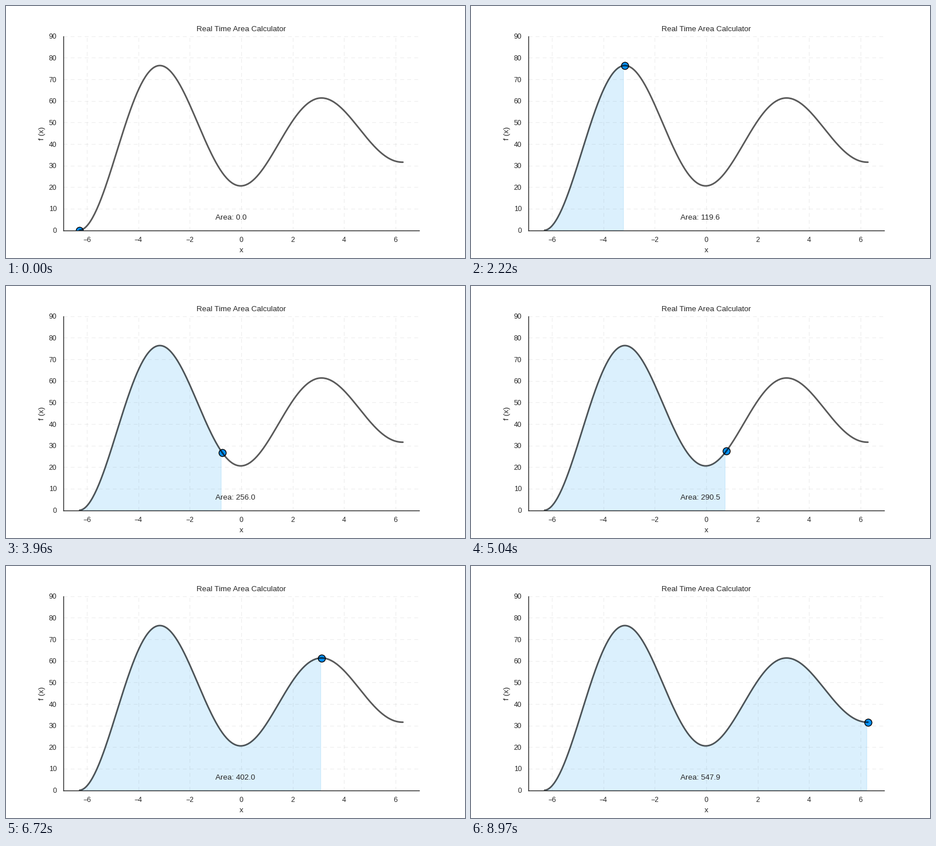
Animation, 800 px wide and 440 px high, one loop 9 s. Source, as a matplotlib script:

```python
import matplotlib.pyplot as plt
import numpy as np
from matplotlib.animation import FuncAnimation
from matplotlib.patches import Polygon

FRAMES = 300
INK = "0.15"

plt.rcParams.update({
    "font.family": "Liberation Sans",
    "font.size": 9.6,
    "axes.titlesize": 9.6,
    "axes.labelsize": 9.6,
    "xtick.labelsize": 8.8,
    "ytick.labelsize": 8.8,
    "text.color": INK,
    "axes.labelcolor": INK,
    "axes.edgecolor": INK,
    "xtick.color": INK,
    "ytick.color": INK,
    "axes.linewidth": 1.0,
    "axes.axisbelow": True,
    "lines.solid_capstyle": "round",
})

# Running sum of a damped sine wave
x = np.linspace(-2 * np.pi, 2 * np.pi, FRAMES)
y = np.cumsum(np.exp(-x / 10) * np.sin(x))
strips = np.diff(x) * (y[1:] + y[:-1]) / 2
area = np.concatenate([[0, 0], np.cumsum(strips)])

fig, ax = plt.subplots(figsize=(8, 4.4), dpi=100)
ax.spines[["top", "right"]].set_visible(False)
ax.tick_params(length=0, pad=8.3)
ax.grid(color="0.8", alpha=0.35, linewidth=0.8, linestyle=(0, (6, 5)))
ax.set(title="Real Time Area Calculator", xlabel="x", ylabel="f (x)")

shade = Polygon([(x[0], 0)], color="#069af3", alpha=0.14, linewidth=0.8)
ax.add_patch(shade)
dot, = ax.plot(x[:1], y[:1], "o", markersize=9, markerfacecolor="#0590f5",
               markeredgecolor="black", markeredgewidth=1)
ax.plot(x, y, color="black", alpha=0.65, linewidth=2)
label = ax.text(-1, 5, "")
ax.set_ylim(0, 90)


def update(i):
    # The shaded part trails the dot by one sample
    shade.set_visible(i > 1)
    if i > 1:
        top = np.column_stack([x[:i], y[:i]])
        shade.set_xy(np.vstack([(x[0], 0), top, (x[i - 1], 0)]))
    dot.set_data([x[i]], [y[i]])
    label.set_text(f"Area: {area[i]:.1f}")
    return shade, dot, label


anim = FuncAnimation(fig, update, frames=FRAMES, interval=30, repeat=True,
                     repeat_delay=0)
plt.show()
```
